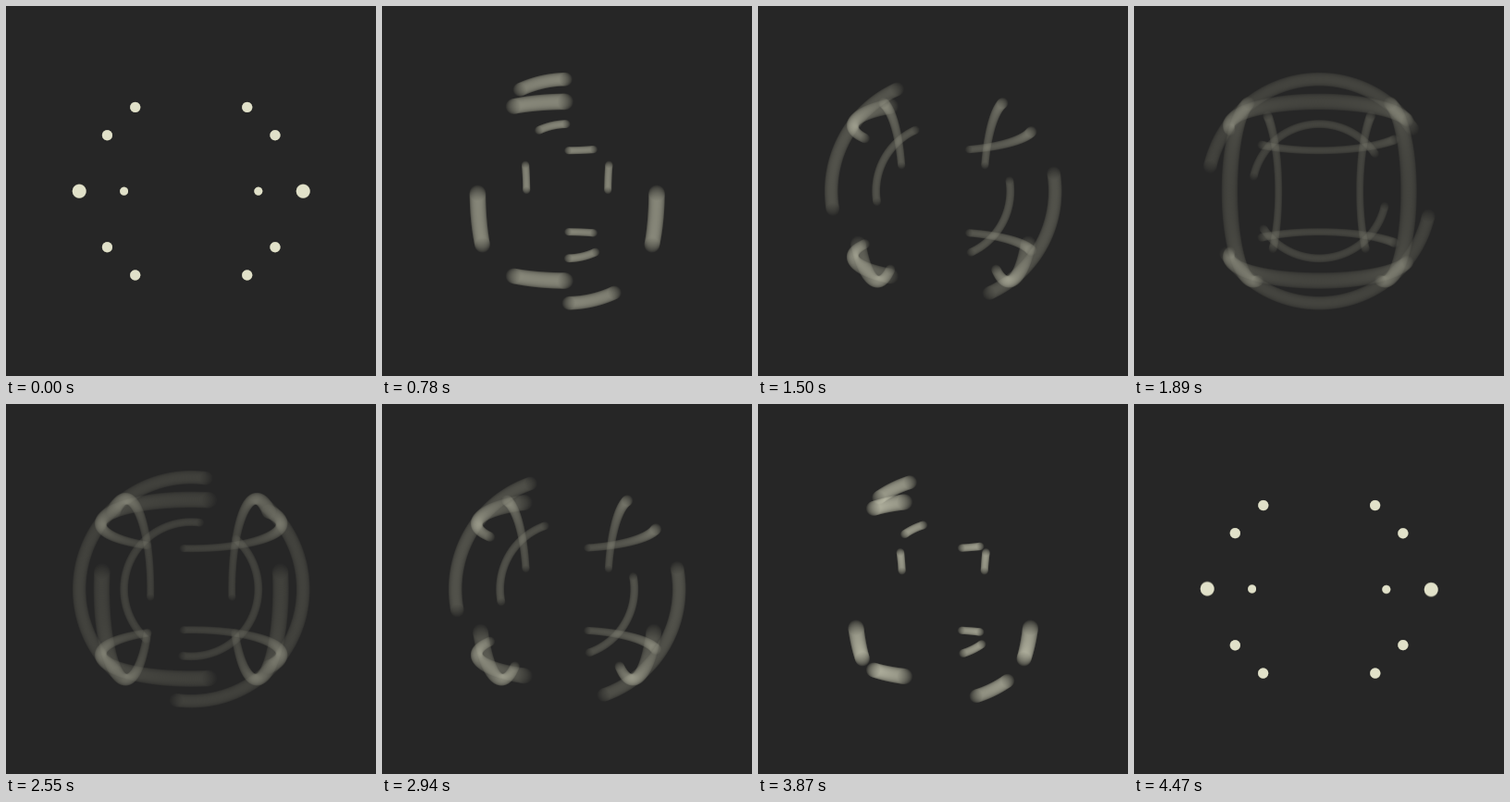
These frames come from a looping animation (400 px wide and 400 px high, 4.5 s). An HTML page with a canvas:

```html
<!DOCTYPE html>
<html lang="en">
<head>
<meta charset="utf-8">
<title>Six spinning rings</title>
<style>
  html, body { margin: 0; width: 100%; height: 100%; overflow: hidden; background: #262626; }
  canvas { display: block; width: 400px; height: 400px; }
</style>
</head>
<body>
<canvas id="stage" width="400" height="400"></canvas>
<script>
const SIZE = 400, CENTER = 200.2;
const LOOP = 4500, STEP = 30;
const UNIT = 30.25, RING = 3, OFFSET = 2, CAMERA = 8, DOT = 5.5;
const TURNS = 10, SHUTTER = 2.7 * STEP / LOOP, SAMPLES = 240;
const GAMMA = 2.2, BACK = [38, 38, 38], INK = [225, 225, 201];

const ctx = document.getElementById('stage').getContext('2d');
const image = ctx.createImageData(SIZE, SIZE);
const light = new Float32Array(SIZE * SIZE);

const toLinear = c => Math.pow(c / 255, GAMMA);
const back = BACK.map(toLinear), ink = INK.map(toLinear);

// Slow start, steep middle, mirrored slow end.
const half = x => x * x / (2.7 - 1.7 * x) / 2;
function ease(p) {
  p -= Math.floor(p);
  return p < 0.5 ? half(2 * p) : 1 - half(2 - 2 * p);
}

// Adds one antialiased disc to the light buffer.
function addDisc(cx, cy, r, weight) {
  const x0 = Math.floor(cx - r - 1), x1 = Math.ceil(cx + r + 1);
  const y0 = Math.floor(cy - r - 1), y1 = Math.ceil(cy + r + 1);
  for (let y = y0; y < y1; y++) {
    for (let x = x0; x < x1; x++) {
      const dx = x + 0.5 - cx, dy = y + 0.5 - cy;
      const cover = r + 0.5 - Math.sqrt(dx * dx + dy * dy);
      if (cover > 0) light[y * SIZE + x] += weight * Math.min(1, cover);
    }
  }
}

function addDot(x, y, z) {
  const k = CAMERA / (CAMERA - z);
  addDisc(CENTER + x * UNIT * k, CENTER + y * UNIT * k, DOT * k, 1 / SAMPLES);
}

// Two opposite dots on each of the six rings around a cube.
function addDots(angle) {
  for (const side of [1, -1]) {
    const a = -RING * side * Math.cos(angle);
    const b = RING * side * Math.sin(angle);
    for (const h of [OFFSET, -OFFSET]) {
      addDot(a, b, h);
      addDot(a, h, -b);
      addDot(h, a, b);
    }
  }
}

function paint() {
  const out = image.data;
  for (let i = 0; i < light.length; i++) {
    const f = Math.min(1, light[i]), o = i * 4;
    for (let c = 0; c < 3; c++) {
      out[o + c] = f > 0
        ? 255 * Math.pow(back[c] + (ink[c] - back[c]) * f, 1 / GAMMA)
        : BACK[c];
    }
    out[o + 3] = 255;
  }
  ctx.putImageData(image, 0, 0);
}

function render(step) {
  const p = step * STEP / LOOP;
  light.fill(0);
  for (let i = 0; i < SAMPLES; i++) {
    const shift = ((i + 0.5) / SAMPLES - 0.5) * SHUTTER;
    addDots(ease(p + shift) * TURNS * 2 * Math.PI);
  }
  paint();
}

const start = performance.now();
let shown = -1;
function tick() {
  const step = Math.floor(((performance.now() - start) % LOOP) / STEP + 0.01);
  if (step !== shown) render(shown = step);
  requestAnimationFrame(tick);
}
tick();
</script>
</body>
</html>
```
